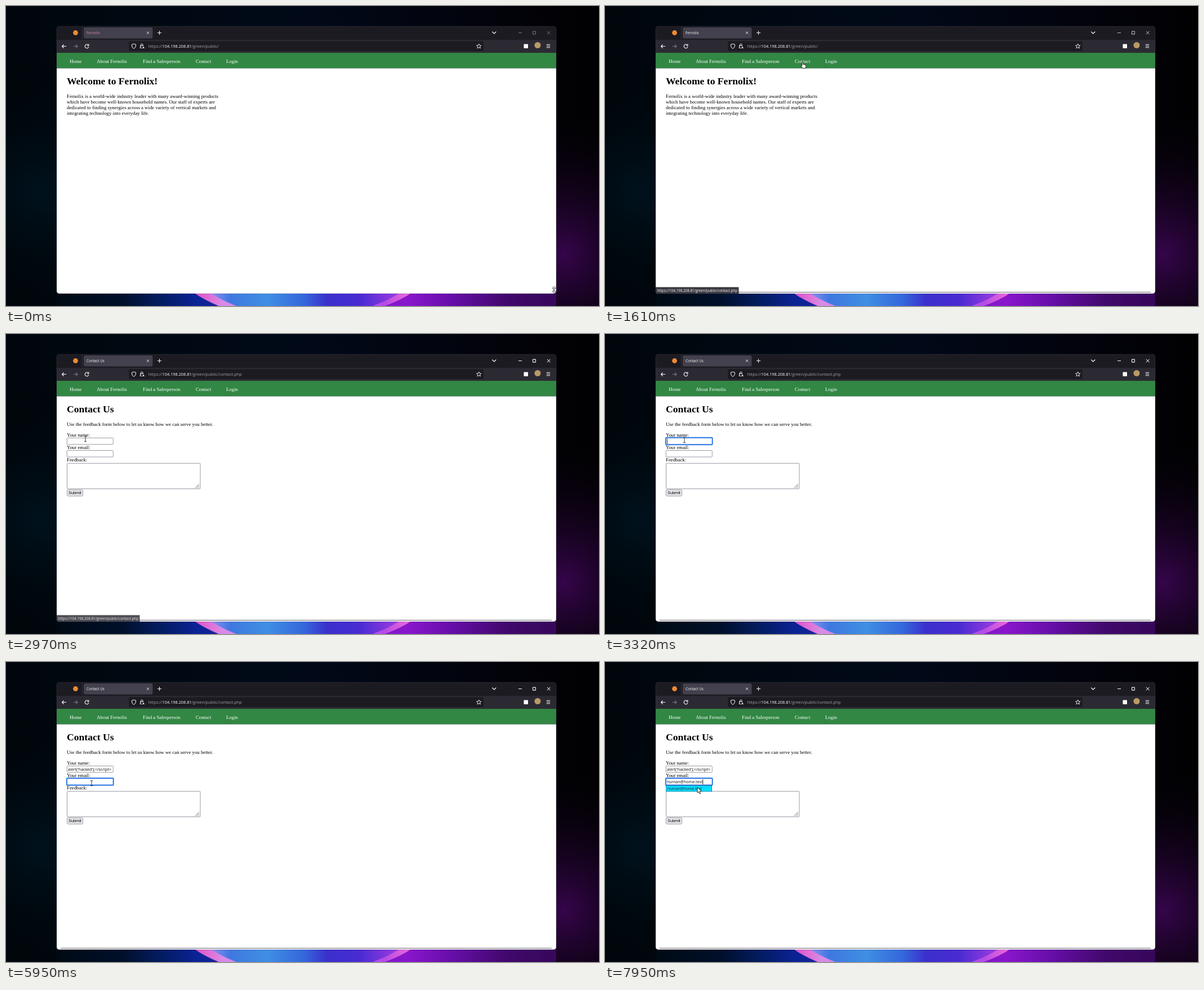
Recreate the animation shown at these times as an HTML page with a canvas. Size 1053 px wide and 532 px high, loop 8 s.

```html
<!DOCTYPE html>
<html lang="en">
<head>
<meta charset="utf-8">
<title>Contact form</title>
<style>
html, body { margin: 0; width: 100%; height: 100%; overflow: hidden; background: #000 }
canvas { display: block }
</style>
</head>
<body>
<canvas id="stage" width="1053" height="532"></canvas>
<script>
const LOOP = 8000, W = 1053, H = 532;
const ctx = document.getElementById('stage').getContext('2d');
const UI = '"Open Sans", sans-serif';
const SERIF = '"Liberation Serif", serif';
const ARIAL = '"Liberation Sans", sans-serif';
const BRAND = 'Fernolix', EMAIL = 'human@home.test';
const SCRIPT = "alert('hacked');<\/script>";
const HOST = '104.198.208.81', DIR = '/green/public/';
const LIGHT = '#fbfbfe', DIM = '#77767e';

const clamp = v => Math.max(0, Math.min(1, v));
const within = (t, a, b) => t >= a && t < b;

function text(str, x, y, size, color, family = SERIF, weight = '') {
  ctx.font = `${weight} ${size}px ${family}`;
  ctx.fillStyle = color;
  ctx.fillText(str, x, y);
  return x + ctx.measureText(str).width;
}
function rect(x, y, w, h, fill) {
  ctx.fillStyle = fill;
  ctx.fillRect(x, y, w, h);
}
function box(x, y, w, h, r, fill, stroke, lw = 1) {
  ctx.beginPath();
  ctx.roundRect(x, y, w, h, r);
  if (fill) { ctx.fillStyle = fill; ctx.fill(); }
  if (stroke) { ctx.strokeStyle = stroke; ctx.lineWidth = lw; ctx.stroke(); }
}
function icon(d, x, y, stroke, lw = 1, fill) {
  const p = new Path2D(d);
  ctx.save();
  ctx.translate(x, y);
  if (fill) { ctx.fillStyle = fill; ctx.fill(p); }
  ctx.strokeStyle = stroke;
  ctx.lineWidth = lw;
  ctx.lineJoin = 'round';
  ctx.stroke(p);
  ctx.restore();
}
function dot(x, y, r, color) {
  ctx.beginPath();
  ctx.arc(x, y, r, 0, 7);
  ctx.fillStyle = color;
  ctx.fill();
}
function linear(x0, y0, x1, y1, ...stops) {
  const g = ctx.createLinearGradient(x0, y0, x1, y1);
  stops.forEach(([at, color]) => g.addColorStop(at, color));
  return g;
}
function glow(x, y, r, color) {
  const g = ctx.createRadialGradient(x, y, 0, x, y, r);
  g.addColorStop(0, color);
  g.addColorStop(1, 'transparent');
  rect(0, 0, W, H, g);
}
function petal(left, right, lowLeft, lowRight, fill) {
  ctx.beginPath();
  ctx.moveTo(left, 508);
  ctx.quadraticCurveTo(left + 18, 521, lowLeft, 533);
  ctx.lineTo(lowRight, 533);
  ctx.quadraticCurveTo(right - 18, 521, right, 508);
  ctx.fillStyle = fill;
  ctx.fill();
}

function wallpaper() {
  rect(0, 0, W, H, linear(0, 0, W, 0,
    [0, '#00060b'], [.25, '#000912'], [.5, '#010918'], [.8, '#02030c'], [1, '#010102']));
  glow(60, 330, 240, 'rgba(0,28,44,.55)');
  glow(990, 440, 260, 'rgba(66,6,92,.8)');
  rect(90, 509, 887, 23, linear(90, 0, 977, 0,
    [0, '#000a14'], [.13, '#00102a'], [.21, '#031c62'], [.28, '#0a2394'],
    [.7, '#8a16cc'], [.78, '#6a0fae'], [.9, '#41086c'], [1, '#36075a']));
  petal(333, 721, 380, 670, linear(335, 0, 718, 0,
    [0, '#e04fc4'], [.13, '#d98be6'], [.5, '#9a7cf0'], [.88, '#b34be6'], [1, '#f06ad6']));
  petal(362, 700, 412, 648, linear(365, 0, 695, 0,
    [0, '#8d8cf0'], [.1, '#3f78e0'], [.3, '#3f8fe4'], [.5, '#3566dc'],
    [.62, '#3a30cc'], [.8, '#4a2bd2'], [1, '#9a3ce0']));
}

function chrome(t) {
  const loading = within(t, 1840, 2600), loaded = t >= 2040;
  const active = t < 1610 ? 0 : t < 1680 ? .5 : 1;

  rect(90, 36, 887, 24, '#1c1b22');
  rect(90, 60, 887, 23, '#2b2a33');
  rect(135, 37, 1, 22, '#34333c');
  dot(123.5, 47.5, 4.4, '#f08a36');
  box(138, 38, 122.5, 19.5, 2.5, '#42414d');

  ctx.save();
  ctx.beginPath();
  ctx.rect(140, 38, 107, 20);
  ctx.clip();
  if (loading) dot(148 + 3 * Math.sin((t - 1990) / 160), 47.8, 1, '#c4c4cc');
  const title = !loaded ? BRAND : loading ? HOST + DIR + 'contact.php' : 'Contact Us';
  text(title, loading ? 155 : 143, 50.2, 6.3, t < 1610 ? '#cf8ba8' : LIGHT, UI);
  ctx.restore();
  rect(236, 40, 11, 15, linear(236, 0, 247, 0, [0, '#42414d00'], [1, '#42414d']));

  icon('M-2-2L2 2M2-2L-2 2', 252, 47.5, LIGHT, .9);
  icon('M-3.5 0H3.5M0-3.5V3.5', 272.5, 47.5, LIGHT);
  icon('M-3.5-1.5L0 2L3.5-1.5', 866.8, 47, LIGHT, 1.1);
  const buttons = color => {
    icon('M-3 0H3', 913, 47.5, color);
    icon('M-2.5-2.5H2.5V2.5H-2.5Z', 938, 47.5, color);
    icon('M-2.7-2.7L2.7 2.7M2.7-2.7L-2.7 2.7', 963.7, 47.5, color);
  };
  buttons(DIM);
  ctx.globalAlpha = active;
  if (active) buttons(LIGHT);
  ctx.globalAlpha = 1;

  const arrow = 'M4 0H-3.5M-.5-3L-3.5 0L-.5 3';
  icon(arrow, 103, 71.5, LIGHT, 1.1);
  ctx.save();
  ctx.translate(123.5, 71.5);
  ctx.scale(-1, 1);
  icon(arrow, 0, 0, '#77767e', 1.1);
  ctx.restore();
  if (loading) icon('M-3-3L3 3M3-3L-3 3', 143.5, 71.5, LIGHT, 1.1);
  else icon('M2.5-2.4A3.4 3.4 0 1 0 3.4 .6M3.4-4V-1.2H.6', 143.5, 71.5, LIGHT, 1.1);

  box(218, 62.5, 630, 17.5, 2.5, '#1c1b22');
  icon('M0-4.2L3.6-3C3.6 1 2.5 3 0 4.2C-2.5 3-3.6 1-3.6-3Z', 227, 71.3, LIGHT);
  icon('M-3-.5H2.6V3.5H-3ZM-2-.5V-2A1.8 1.8 0 0 1 1.6-2V-.5', 241.5, 71, LIGHT);
  icon('M0-2.4L2.6 2.2H-2.6Z', 244, 73, '#1c1b22', 1, LIGHT);
  let x = text('https://', 252.5, 74.2, 7.35, '#a3a2aa', UI);
  x = text(HOST, x, 74.2, 7.35, LIGHT, UI);
  text(DIR + (loaded ? 'contact.php' : ''), x, 74.2, 7.35, '#a3a2aa', UI);
  icon('M0-4.2L1.2-1.4L4.2-1.2L1.9 .8L2.6 3.8L0 2.2L-2.6 3.8L-1.9 .8L-4.2-1.2L-1.2-1.4Z', 839.7, 71.2, LIGHT, .9);
  box(919.5, 67.5, 7.5, 7.5, 1, LIGHT);
  dot(944, 69.5, 5.5, '#b99a68');
  icon('M-3.2-2.7H3.2M-3.2 0H3.2M-3.2 2.7H3.2', 963, 71, LIGHT);
}

function field(y, value, focused) {
  if (focused) {
    box(107, y - 1, 84.5, 14, 2, '#fff', '#b8d3f8', 1.4);
    box(108, y, 82.5, 12, 1, '#fff', '#0a60df', 1.5);
  } else box(108.3, y + .3, 82, 11.5, 1, '#fff', '#8f8f9d', .9);
  text(value, 110, y + 8.7, 7.1, '#111', UI);
}

function home() {
  text(`Welcome to ${BRAND}!`, 108, 138.5, 17.6, '#000', SERIF, 'bold');
  [`${BRAND} is a world-wide industry leader with many award-winning products`,
    'which have become well-known household names. Our staff of experts are',
    'dedicated to finding synergies across a wide variety of vertical markets and',
    'integrating technology into everyday life.'
  ].forEach((line, i) => text(line, 108, 163 + i * 10.1, 8.8, '#000'));
}

function contact(t) {
  text('Contact Us', 108, 138.5, 17.6, '#000', SERIF, 'bold');
  text('Use the feedback form below to let us know how we can serve you better.', 108, 163, 8.8, '#000');
  text('Your name:', 108, 181.8, 8.8, '#000');
  text('Your email:', 108, 204, 8.8, '#000');
  text('Feedback:', 108, 226.2, 8.8, '#000');
  field(184, t >= 4310 ? SCRIPT : '', within(t, 3180, 5420));
  const typed = t < 6680 ? '' : t < 7890 ? EMAIL[0] : EMAIL;
  field(206.2, typed, t >= 5420);

  box(108.5, 229.3, 236.5, 45.2, 1, '#fff', '#8f8f9d', .9);
  icon('M-7 0L0-7M-4 0L0-4M-1.3 0L0-1.3', 343, 273, '#55555c', .8);
  box(108.4, 276.3, 28.2, 11, 2, '#e9e9ed', '#8f8f9d', .9);
  text('Submit', 111, 284.4, 7.33, '#000', ARIAL);

  if (within(t, 3180, 3710) || within(t, 4240, 4770)) rect(t < 4310 ? 110 : 188, 185.5, .8, 9.5, '#000');
  if (within(t, 5420, 5950) || within(t, 6480, 7030) || t >= 7560) {
    ctx.font = `7.1px ${UI}`;
    rect(110 + ctx.measureText(typed).width, 208, .8, 9, '#000');
  }
  if (t >= 6680) {
    const hover = t >= 7430;
    rect(108, 218.7, 82, 11.3, '#52525e');
    rect(108.6, 219.3, 80.8, 10.2, hover ? '#00ddff' : '#42414d');
    text(EMAIL, 111, 227.2, 6.8, hover ? '#2b2a33' : LIGHT, UI);
  }
}

function page(t) {
  rect(90, 83, 887, 27.5, '#328744');
  rect(90, 110.5, 887, 400, '#fff');
  [['Home', 113], [`About ${BRAND}`, 161], ['Find a Salesperson', 243], ['Contact', 337], ['Login', 391]]
    .forEach(([label, x]) => text(label, x, 100.5, 8.8, '#fff'));
  if (t < 2040) home(); else contact(t);
  if (t >= 70) rect(97, 507, 872, 1, '#66666c');
  if (t >= 900) rect(390.5, 108, 2.5, 1, '#1f5a2e');

  const transfer = within(t, 1910, 2600);
  const fade = transfer ? 1 : Math.min(clamp((t - 1200) / 200), clamp((3140 - t) / 190));
  if (fade) {
    ctx.globalAlpha = fade;
    rect(90, 498.5, transfer ? 118 : 147.5, 11.5, '#3b3a42');
    text(transfer ? `Transferring data from ${HOST}…` : `https://${HOST}${DIR}contact.php`,
      92.5, 506.8, 6.3, LIGHT, UI);
    ctx.globalAlpha = 1;
  }
}

// Pointer waypoints: time, x, y
const TRACK = [
  [70, 390, 154], [410, 390, 153], [800, 390, 116], [1000, 372, 103], [1150, 351, 99],
  [2480, 351, 99], [2630, 327, 113], [2970, 141, 186], [3320, 141, 188],
  [4900, 141, 188], [5400, 152, 215], [6350, 152, 215], [7360, 160, 219], [7560, 164, 222]
];
const SHAPES = {
  arrow: ['M0 0V10L2.3 8L4 11.8L5.7 11L4.1 7.4H7.2Z', '#000', .8, '#fff'],
  hand: ['M-1 0Q0-1 1 0V4.4L4.8 5.2Q6 5.6 6 7L5.2 11.4H0L-3 7.2Q-3.2 5.6-1 6.8Z', '#000', .8, '#fff'],
  beam: ['M-2-4.5H2M-2 4.5H2M0-4.5V4.5', '#222', .9],
  resize: ['M0-6L3-2.8H1V2.8H3L0 6L-3 2.8H-1V-2.8H-3Z', '#222', .8, '#fff']
};

function pointer(t) {
  if (t < 70) return icon(SHAPES.resize[0], 973.3, 503.3, ...SHAPES.resize.slice(1));
  if (within(t, 6350, 7360)) return;
  const next = TRACK.findIndex(p => p[0] > t);
  const b = TRACK[next < 0 ? TRACK.length - 1 : next];
  const a = next < 0 ? b : TRACK[next - 1];
  const k = a === b ? 0 : (t - a[0]) / (b[0] - a[0]);
  const x = a[1] + (b[1] - a[1]) * k, y = a[2] + (b[2] - a[2]) * k;
  const kind = within(t, 1050, 2560) ? 'hand' : within(t, 2880, 6350) ? 'beam' : 'arrow';
  const [d, ...style] = SHAPES[kind];
  icon(d, x, y, ...style);
}

function frame(now) {
  const t = now % LOOP;
  wallpaper();
  ctx.save();
  ctx.beginPath();
  ctx.roundRect(90, 36, 887, 474, 4.5);
  ctx.clip();
  chrome(t);
  page(t);
  ctx.restore();
  box(90, 36, 887, 474, 4.5, null, 'rgba(90,90,100,.4)', .7);
  pointer(t);
  requestAnimationFrame(frame);
}
requestAnimationFrame(frame);
</script>
</body>
</html>
```
